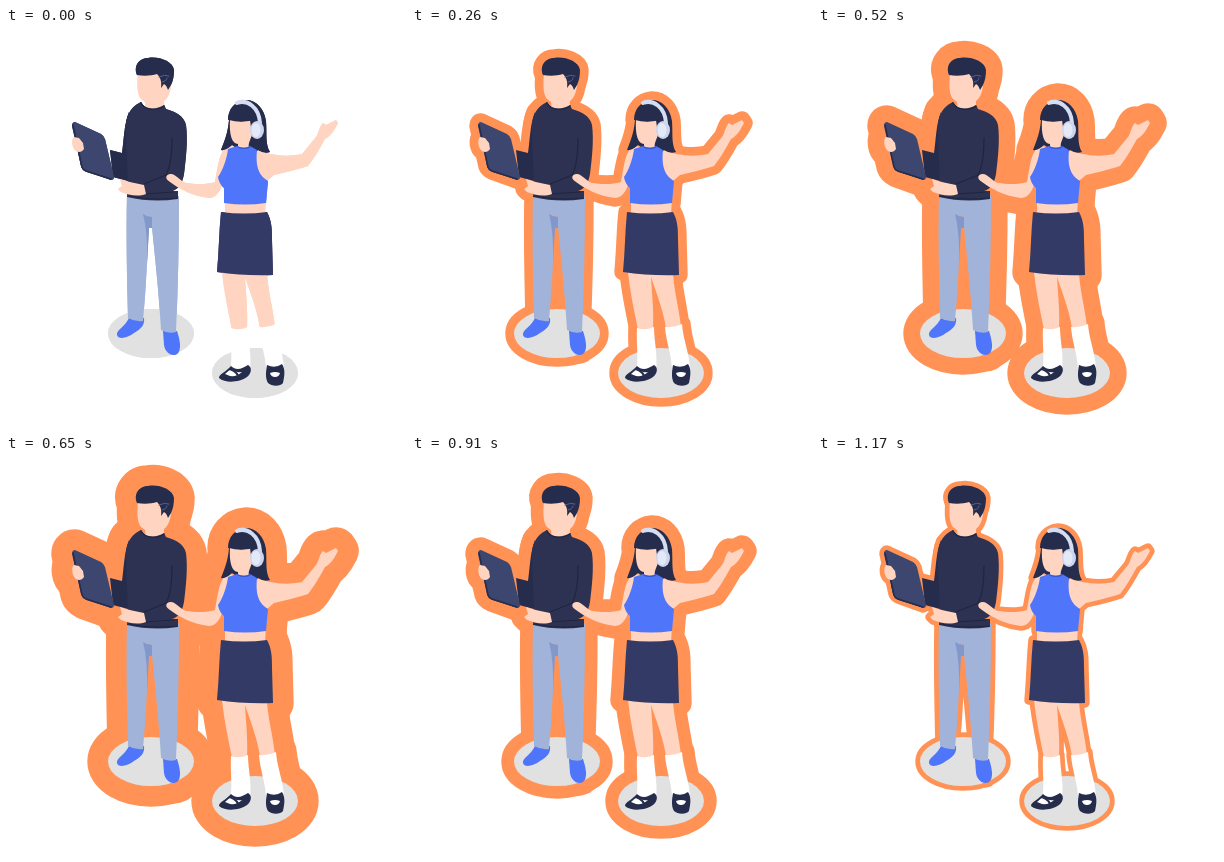
Animation, 400 px wide and 400 px high, one loop 1300 ms. Source, as an HTML page:

```html
<!DOCTYPE html>
<html>
<head>
<meta charset="utf-8">
<style>
html, body { margin: 0; width: 100%; height: 100%; overflow: hidden; background: #fff; }
svg { display: block; width: 100vw; height: 100vh; }
.skin { fill: #ffd4c1; }
.navy { fill: #262c4c; }
.shirt { fill: #2d3252; }
.skirt { fill: #343a66; }
.blue { fill: #4f75fb; }
.pants { fill: #a2b3da; }
.pale { fill: #cbd5ee; }
.sock { fill: #fff; }
.floor { fill: #e1e1e1; }
.line { fill: none; stroke-linecap: round; }
</style>
</head>
<body>
<svg viewBox="0 0 400 400">
  <use id="halo" href="#people" stroke="#ff9254" stroke-linejoin="round"/>
  <g id="people">
    <ellipse class="floor" cx="145" cy="305.5" rx="43" ry="24.5"/>
    <ellipse class="floor" cx="249" cy="345" rx="43" ry="25"/>

    <g id="man">
      <path class="blue" d="M111 307C110 302 119 299 123 290L138 290C139 297 135 301 128 305C122 310 112 312 111 307Z"/>
      <path class="blue" d="M157 303L171 303C174 312 176 322 171 326C165 329 159 324 158 317Z"/>
      <path class="pants" d="M121 166L173 168C173 215 172 260 170 304Q162 306 155 302C153 265 149 230 145 189L142 188C142 225 140 260 137 293Q129 294 122 290C121 250 120 205 121 166Z"/>
      <path fill="#8298cb" d="M137 186Q141 189 146 189L146 200L143 200L141 236Q142 205 137 186Z"/>
      <path class="navy" d="M123 84C118 96 118 112 116 125L104 122L107 149L122 153L130 120Z"/>
      <path class="skin" d="M132 45C131 57 131 66 135 71L139 74L140 82L158 80L158 73C162 70 164 65 165 58L150 42Z"/>
      <path class="shirt" d="M135 74C139 82 150 82 158 77L160 81C170 84 178 88 180 97C182 112 180 130 178 146C176 157 172 161 166 163L172 163L172 171Q146 175 121 169C123 150 120 125 120 105C119 92 122 80 135 74Z"/>
      <path class="line" stroke="#20253f" stroke-width="1.2" d="M135 75C139 83 151 83 158 78M166 110C166 125 165 138 160 147L138 156M138 166L168 164M122 168Q146 173 171 170"/>
      <path class="navy" d="M131 47C127 37 134 30 142 30C152 28 167 33 168 42C168 48 167 53 165 57L162 62C161 59 160 57 158 56L155 60C156 53 154 49 151 46C145 48 137 48 131 47Z"/>
      <path class="line" stroke="#56608c" stroke-width="1" d="M153 49Q159 46 163 48M156 54Q161 53 161 50"/>
      <path class="skin" d="M114 151C122 154 130 155 138 157L140 166C132 169 122 167 115 164L112 161L116 158Z"/>
      <path fill="#3d466f" d="M69 94L95 106Q98 108 99 111L108 149Q108 152 105 152L80 143Q76 141 75 138L66 98Q66 94 69 94Z"/>
      <path class="line" stroke="#262c4c" stroke-width="1.5" d="M67 97L76 139Q77 142 80 143L105 151"/>
      <path class="skin" d="M68 109C65 112 66 120 70 123C73 125 76 124 78 121L77 115L73 110Z"/>
    </g>

    <g id="woman">
      <path class="skin" d="M216 244L239 245L261 245C262 263 267 280 269 299L254 301C252 284 244 264 239 249C240 266 242 284 241 302L226 302C222 282 218 264 216 244Z"/>
      <path class="sock" d="M225 300Q233 303 242 299C242 313 246 327 244 342L224 344C227 330 224 316 225 300Z"/>
      <path class="sock" d="M253 299Q262 300 270 296C271 311 277 324 278 340L260 342C260 328 254 314 253 299Z"/>
      <path class="navy" d="M213 350C213 346 220 344 225 338C230 343 236 341 242 337C246 339 246 345 241 349C234 354 220 356 213 350Z"/>
      <path class="sock" d="M219 346Q223 342 226 341Q229 345 236 344Q231 349 224 348Z"/>
      <path class="line" stroke="#262c4c" stroke-width="2" d="M224 341Q233 345 232 350"/>
      <path class="navy" d="M261 337Q269 341 276 336C280 342 278 350 277 355C274 359 265 358 262 355C259 350 260 343 261 337Z"/>
      <path class="sock" d="M264 345Q269 343 274 345Q273 349 269 349Q265 349 264 345Z"/>
      <path class="line" stroke="#262c4c" stroke-width="2" d="M262 343Q270 340 277 343"/>

      <path class="skin" d="M223 118C213 121 212 139 209 154C200 157 188 156 180 155C173 152 169 145 164 146C159 147 159 151 164 154C173 161 187 168 203 170C212 170 215 160 219 150L219 187L259 187L261 153L268 147C277 145 290 142 302 138C307 132 313 122 319 111C325 108 329 101 332 95L330 92L320 97L317 95C313 99 313 105 310 109L296 126C277 130 263 126 250 122Z"/>
      <path class="navy" d="M223 92C222 104 219 112 215 122Q220 123 226 117L232 121L243 120Q244 125 248 126L252 122Q258 126 264 124C259 116 261 106 260 93C258 80 250 72 240 72C229 73 222 81 222 92Z"/>
      <path class="skin" d="M224 91Q234 95 244 92L246 107C244 113 242 115 243 120L232 120L232 116C226 116 223 107 224 91Z"/>
      <path class="blue" d="M231 118Q237 121 244 118L251 122C250 133 250 146 262 153L260 175Q239 178 218 175L218 160Q213 156 212 149C217 142 221 130 222 121Z"/>
      <path class="line" stroke="#3457c8" stroke-width="1.2" d="M232 119Q238 122 244 119"/>
      <path class="skirt" d="M215 184Q238 187 261 184C266 193 266 202 266 212L267 247Q238 248 211 244C213 223 213 203 215 184Z"/>
      <path class="navy" d="M223 92Q236 96 251 91L246 78L230 78Z"/>
      <path class="line" stroke="#d5ddf2" stroke-width="4" d="M231 75C241 71 253 79 254 95"/>
      <ellipse class="pale" cx="251" cy="102" rx="7" ry="9"/>
      <ellipse fill="#e3e9f7" cx="250" cy="102" rx="4.5" ry="7"/>
    </g>
  </g>
</svg>
<script>
const halo = document.getElementById("halo");
const STEP = 130, STEPS = 10, GROWTH = 4;

function draw(now) {
  const step = Math.floor(now / STEP) % STEPS;
  const level = Math.min(step, STEPS - step);
  const radius = level && GROWTH * level + 0.7;
  halo.setAttribute("stroke-width", 2 * radius);
  requestAnimationFrame(draw);
}
draw(0);
</script>
</body>
</html>
```
